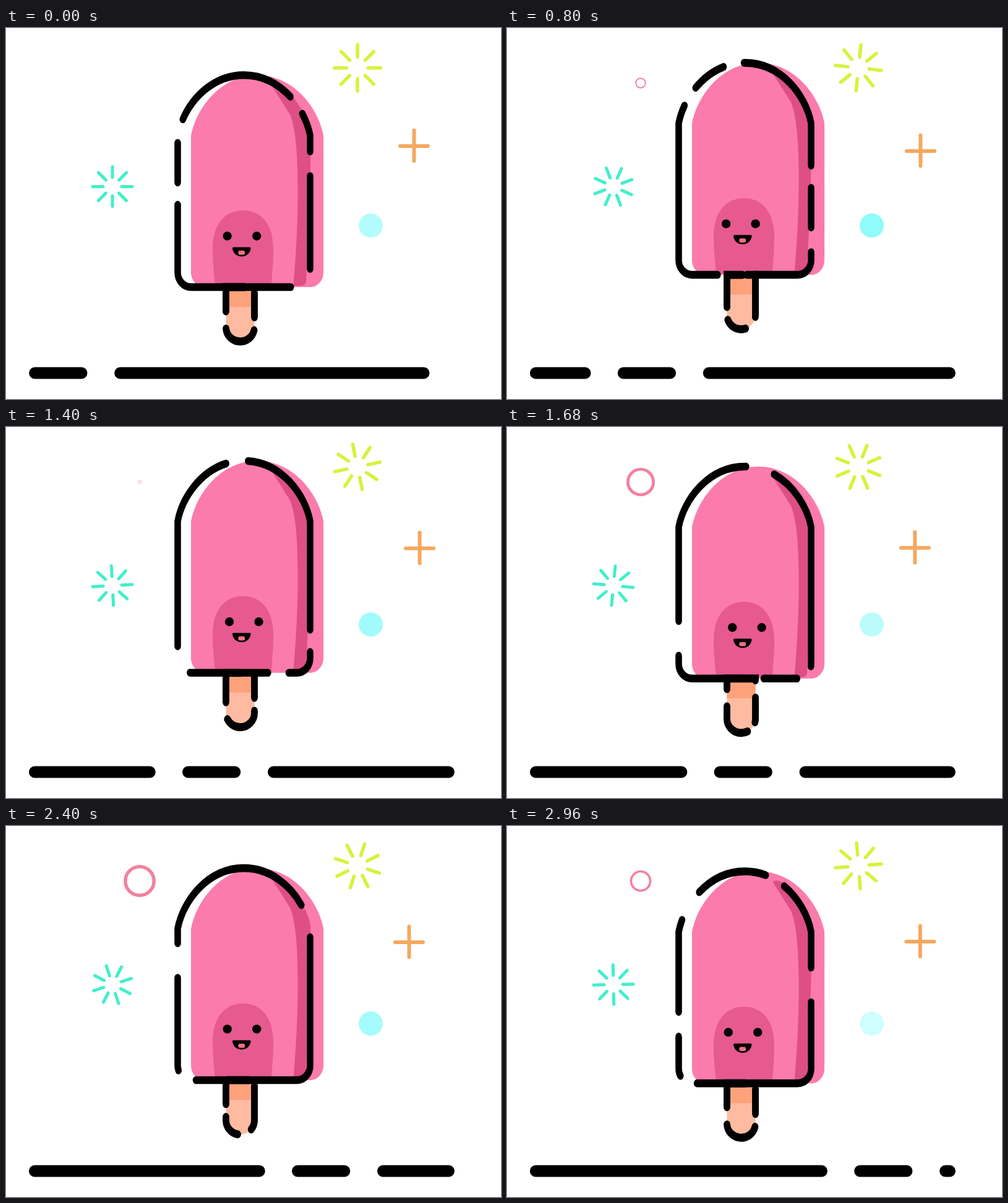
Animation, 800 px wide and 600 px high, one loop 3 s. Source, as an HTML page with a canvas:

```html
<!DOCTYPE html>
<html lang="en">
<head>
<meta charset="utf-8">
<title>Ice pop</title>
<style>
  html, body { margin: 0; width: 100%; height: 100%; overflow: hidden; background: #fff; }
  canvas { display: block; }
</style>
</head>
<body>
<canvas id="stage" width="800" height="600"></canvas>
<script>
const ctx = document.getElementById('stage').getContext('2d');
const LOOP = 3;
const SQUEEZE = 0.84; // outlines are drawn narrowed in x, pen included

const body = new Path2D(
  'M0 76.2 C69.6 76.2 117.3 129 127.4 174 V395 C127.4 408.5 116 419 101.4 419' +
  'H-101.4 C-116 419 -127.4 408.5 -127.4 395 V174 C-117.3 129 -69.6 76.2 0 76.2 Z');
const stick = new Path2D('M-27.4 420 V419 H27.4 V484 A27.4 23 0 0 1 -27.4 484 Z');
const shade = new Path2D(
  'M430 94 C429 90 440 90 448 96 C468 113 486 140 492 168 C493 240 489 330 485 410' +
  'Q484 417 476 417 H464.5 C470 350 472 300 471.5 250 C471 200 468 162 459 140 Z');
const cheek = new Path2D(
  'M338 416.5 C336 395 334 378 334 358 C334 318 353 295 383 295' +
  'C413 295 432 318 432 358 C432 380 430 395 429 416.5 Z');
const mouth = new Path2D(
  'M368 354.5 H393.5 Q396 354.5 395.5 357.5 C393.5 365.5 388 369.5 380.7 369.5' +
  'C373.5 369.5 368 365.5 366 357.5 Q365.5 354.5 368 354.5 Z');

// Corners of the plus sign's drift: time, x, y.
const drift = [
  [0, 659.5, 191], [0.32, 650, 202.5], [1.12, 678, 197],
  [1.68, 659.3, 195.5], [2.4, 651.5, 188], [3, 668, 187]
];

const clamp = (v, low, high) => Math.max(low, Math.min(high, v));

// Rises from start to top and falls back to zero at end.
function peak(t, start, top, end, height) {
  const k = t < top ? (t - start) / (top - start) : (end - t) / (end - top);
  return height * Math.max(0, k) ** 1.1;
}

const lift = t => Math.max(peak(t, 0, 1.16, 2.1, 29.8), peak(t, 1.7, 2.5, 3.2, 9.3));
const glow = t => Math.min(1, 0.4 + Math.max(peak(t, -0.3, 0.7, 2, 1), peak(t, 1.7, 2.4, 3, 0.4)));
const gaze = t => clamp(11.5 * (t - 1.115), -34 * t, Math.max(0, 34 * (2.23 - t)));

function pulse(t) {
  const period = 0.68, p = t % period;
  return Math.min(1, 2.47 * p, 4.3 * (period - p));
}

function driftAt(t) {
  const i = Math.max(1, drift.findIndex(p => p[0] >= t));
  const [t0, x0, y0] = drift[i - 1], [t1, x1, y1] = drift[i];
  const k = (1 - Math.cos(Math.PI * (t - t0) / (t1 - t0))) / 2;
  return [x0 + (x1 - x0) * k, y0 + (y1 - y0) * k];
}

function pen(color, width) {
  ctx.strokeStyle = color;
  ctx.lineWidth = width;
}

function line(x0, y0, x1, y1) {
  ctx.beginPath();
  ctx.moveTo(x0, y0);
  ctx.lineTo(x1, y1);
  ctx.stroke();
}

function circle(x, y, r) {
  ctx.beginPath();
  ctx.arc(x, y, r, 0, Math.PI * 2);
}

function disc(x, y, r, color) {
  ctx.fillStyle = color;
  circle(x, y, r);
  ctx.fill();
}

function paint(path, color) {
  ctx.fillStyle = color;
  ctx.fill(path);
}

function narrowed(x, draw) {
  ctx.save();
  ctx.translate(x, 0);
  ctx.scale(SQUEEZE, 1);
  draw();
  ctx.restore();
}

function dashed(dash, shift, draw) {
  ctx.setLineDash(dash);
  ctx.lineDashOffset = -shift;
  draw();
  ctx.setLineDash([]);
}

function burst(x, y, inner, outer, degrees, color, width) {
  ctx.save();
  ctx.translate(x, y);
  ctx.rotate(degrees * Math.PI / 180);
  pen(color, width);
  for (let i = 0; i < 8; i++) {
    line(inner, 0, outer, 0);
    ctx.rotate(Math.PI / 4);
  }
  ctx.restore();
}

function drawDecor(t) {
  burst(172, 256.5, 15, 32, 30 * t, '#42efcb', 5);
  burst(568, 64.5, 17.5, 37.2, 120 * t, '#d3f43c', 5.5);

  const size = pulse(t);
  if (size > 0.01) {
    pen('#f4809f', 6.2 * size);
    circle(216, 89, 26 * size);
    ctx.stroke();
  }

  const [x, y] = driftAt(t);
  pen('#f5a85f', 6);
  line(x - 22.5, y, x + 22.5, y);
  line(x, y - 25.5, x, y + 24);

  ctx.globalAlpha = glow(t);
  disc(589.5, 319.5, 19.5, '#8ffbfa');
  ctx.globalAlpha = 1;
}

function drawFace(look) {
  for (const x of [357.7, 405.2]) disc(x + look, 336.5, 7.2, '#000');
  paint(mouth, '#000');
  ctx.fillStyle = '#f0707e';
  ctx.beginPath();
  ctx.roundRect(375.3, 360, 10.8, 6.8, 3);
  ctx.fill();
}

function drawPop(t) {
  ctx.save();
  ctx.translate(0, -lift(t));

  narrowed(378.5, () => {
    paint(stick, '#febba2');
    ctx.fillStyle = '#fea27b';
    ctx.fillRect(-27.4, 419, 54.8, 32);
  });
  narrowed(406, () => paint(body, '#fb7bac'));
  paint(shade, '#dd4f85');
  paint(cheek, '#e65a8f');
  drawFace(gaze(t));

  pen('#000', 13);
  narrowed(378.5, () => dashed([72, 28, 40, 21], 125.5 + 109 * t, () => ctx.stroke(stick)));
  pen('#000', 12.6);
  narrowed(384.5, () => dashed([64, 40, 150, 56, 340, 36], 134 + 178.5 * t, () => ctx.stroke(body)));
  ctx.restore();
}

function drawGround(t) {
  pen('#000', 18.8);
  dashed([75.5, 62.5, 490.5, 62], 177 * t, () => line(46.4, 558, 715.5, 558));
}

function frame(now) {
  const t = Math.max(0, now - start) / 1000 % LOOP;
  ctx.clearRect(0, 0, 800, 600);
  drawDecor(t);
  drawPop(t);
  drawGround(t);
  requestAnimationFrame(frame);
}

ctx.lineCap = 'round';
const start = performance.now();
frame(start);
</script>
</body>
</html>
```
